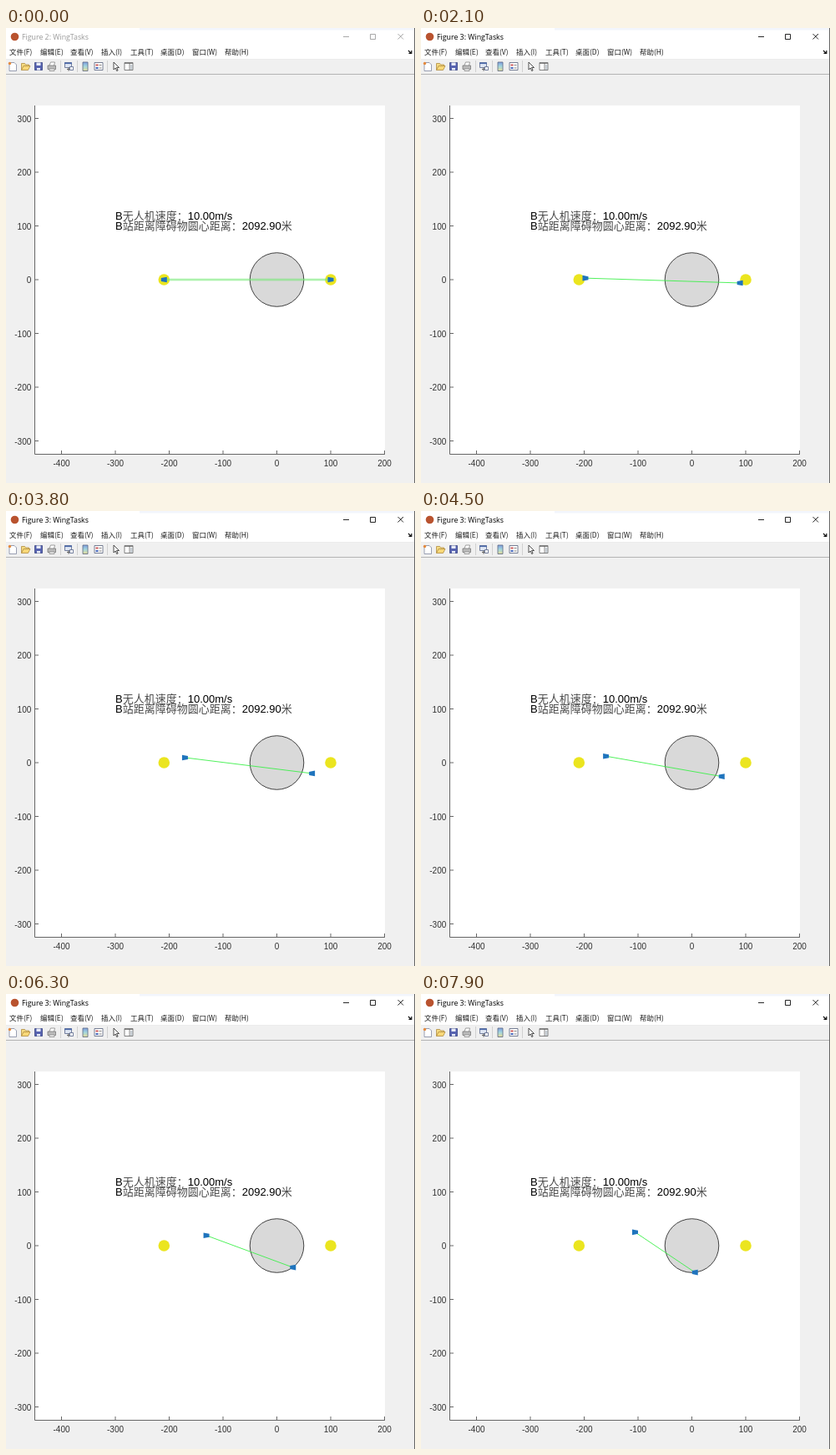
An HTML page that plays this animation: 490 px wide and 546 px high, repeating every 8000 ms.

```html
<!DOCTYPE html>
<html lang="zh">
<head>
<meta charset="utf-8">
<style>
  html, body { margin: 0; height: 100%; overflow: hidden; background: #fff; }
  svg { display: block; width: 490px; height: 546px; }
  .title { font: 8.8px "Open Sans", sans-serif; }
  .menu { font: 8.5px "Noto Sans CJK SC", "Noto Sans CJK", sans-serif; fill: #1c1c1c; }
  .tick { font: 10px "Liberation Sans", Arial, sans-serif; fill: #333; }
  .note { font: 300 13px "Liberation Sans", "Noto Sans CJK SC", "Noto Sans CJK", sans-serif; }
  .note tspan { fill: #4a4a4a; }
</style>
</head>
<body>
<svg viewBox="0 0 490 546">
  <rect width="490" height="546" fill="#fdfffe"/>
  <rect width="490" height="20" fill="#fff"/>
  <rect x="160" width="330" height="2.5" fill="#f2f5fc"/>
  <circle cx="10.5" cy="10.5" r="4.8" fill="#b9532f"/>
  <g id="bar">
    <text id="title" class="title" x="19" y="13.5"></text>
    <path d="M404 10.500h7M436.500 7.500h6v6h-6zM469.500 7l6.500 6.500M476 7l-6.500 6.500"
      fill="none" stroke="currentColor" stroke-width=".85"/>
  </g>

  <g id="figure">
    <path d="M0 20H490V38H0z" fill="#fff"/>
    <path d="M0 38H490V546H0z" fill="#f0f0f0"/>
    <path d="M0 37.500H490" stroke="#ececec"/>
    <path d="M0 55.500H490" stroke="#b4b4b4"/>
    <g id="menu" class="menu"></g>
    <path d="M482 27l3 3m.8-3v3.300h-3.300" fill="none" stroke="#111" stroke-width="1.200"/>

    <g fill="none" stroke-width=".8">
      <path d="M65.500 39v14M85.500 39v14M121.500 39v14" stroke="#c8c8c8"/>
      <path d="M4 41.500h6l2.500 2.500v7.500H4z" fill="#fff" stroke="#8088a0"/>
      <circle cx="4.500" cy="42.500" r="1.700" fill="#e58a3c"/>
      <path d="M18.500 50.500v-8h4l1 1.500h4v2" fill="#f5dc83" stroke="#b08c40"/>
      <path d="M18.500 50.500l2.500-5h8l-2.500 5z" fill="#f8d878" stroke="#b08c40"/>
      <path d="M34.500 41.500h9v9h-9z" fill="#5763b0" stroke="#3c4784"/>
      <path d="M36.500 41.500h5v3.500h-5zM37 48h4v2.500h-4z" fill="#e9edf8"/>
      <path d="M52 45l1.500-4h5l-1 4" fill="#fff" stroke="#888"/>
      <path d="M50 45h9.500v4.500H50z" fill="#bbb" stroke="#777"/>
      <path d="M52 49h6v2.500h-6z" fill="#eee" stroke="#888"/>
      <path d="M70.500 41.500h8v6h-8z" fill="#dfe6f3" stroke="#56648a"/>
      <path d="M70 42.300h9" stroke="#4b68a8" stroke-width="1.600"/>
      <path d="M73 49.500h4m-2-2v4" stroke="#666" stroke-width="1.200"/>
      <path d="M76.500 46.500h4v4h-4z" fill="#fff" stroke="#56648a"/>
      <path d="M92 41h6v10.500h-6z" fill="url(#spectrum)" stroke="#5a6680"/>
      <path d="M106 41.500h10v9h-10z" fill="#fff" stroke="#56607c"/>
      <path d="M107.500 44.500h3" stroke="#c55" stroke-width="2"/>
      <path d="M107.500 48h3" stroke="#46b" stroke-width="2"/>
      <path d="M111.500 44.500h3m-3 3.500h3" stroke="#666"/>
      <path d="M129 41v9l2.200-2 1.500 3.500 1.400-.6-1.500-3.400h2.900z" fill="#fff" stroke="#222"/>
      <path d="M142 41.500h10v9h-10z" fill="#fff" stroke="#666"/>
      <path d="M142 42.500h10M148 42v8.500" stroke="#666"/>
      <path d="M149 45h2.500m-2.500 2h2.500m-2.500 2h2.500" stroke="#789"/>
    </g>

    <path d="M35 93H454V511H35z" fill="#fff"/>
    <path d="M34.500 93V511.500H454" fill="none" stroke="#666"/>
    <g id="axes" class="tick" stroke-width=".9"></g>
    <g class="note">
      <text x="131" y="230.300">B<tspan>无人机速度：</tspan>10.00m/s</text>
      <text x="131" y="242.300">B<tspan>站距离障碍物圆心距离：</tspan>2092.90<tspan>米</tspan></text>
    </g>

    <circle cx="324.500" cy="302" r="32.300" fill="#d9d9d9" stroke="#222" stroke-width=".85"/>
    <g fill="#ebe51f">
      <circle cx="189.300" cy="302" r="6.800"/>
      <circle cx="389" cy="302" r="6.800"/>
    </g>
    <path id="halo" d="M190 302H388" stroke="#4e4" stroke-width="2.800" opacity=".28"/>
    <path id="link" fill="none" stroke-width=".9"/>
    <path id="left" d="M-3.500-3.300L3.500-2V2L-3.500 3.300z" fill="#1f74bd"/>
    <path id="right" d="M-3.500-3.300L3.500-2V2L-3.500 3.300z" fill="#1f74bd"/>
  </g>
  <path d="M489.500 0V546" stroke="#666"/>
  <defs>
    <linearGradient id="spectrum" x2="0" y2="1">
      <stop stop-color="#7f9fe0"/><stop offset=".5" stop-color="#a5d8dc"/><stop offset="1" stop-color="#e8dd98"/>
    </linearGradient>
  </defs>
</svg>
<script>
const LOOP = 8000, STEP = 100, OPENED = 1100, DRAWN = 1300, DEPART = 1350;
const SPEED = 10.55;               // pixels per second
const CENTER = { x: 324.5, y: 302 }, RADIUS = 32.3;
const LEFT = 189.3, RIGHT = 389;
const $ = id => document.getElementById(id);

const text = (x, y, label, anchor = 'start') =>
  `<text x="${x}" y="${y}" text-anchor="${anchor}">${label}</text>`;
const mark = d => `<path d="${d}" stroke="#555"/>`;

const menus = { 4: '文件(F)', 41: '编辑(E)', 77: '查看(V)', 114: '插入(I)',
  149: '工具(T)', 185: '桌面(D)', 223: '窗口(W)', 262: '帮助(H)' };
$('menu').innerHTML = Object.entries(menus).map(([x, label]) => text(x, 32, label)).join('');

let axes = '';
for (let v = -400; v <= 300; v += 100) {
  const x = CENTER.x + v * .645, y = CENTER.y - v * .645;
  if (v <= 200) axes += text(x, 525.6, v, 'middle') + mark(`M${x} 511v-4`);
  if (v >= -300) axes += text(30.3, y + 4, v, 'end') + mark(`M35 ${y}h4`);
}
$('axes').innerHTML = axes;

// Straight along the tangent, then around the obstacle.
function detour(dist) {
  const tangent = RADIUS * Math.sqrt(3);
  if (dist < tangent) return { x: RIGHT - dist * Math.cos(Math.PI / 6), y: CENTER.y + dist / 2 };
  const a = Math.PI / 3 + (dist - tangent) / RADIUS;
  return { x: CENTER.x + RADIUS * Math.cos(a), y: CENTER.y + RADIUS * Math.sin(a) };
}

function place(id, p, facing) {
  $(id).setAttribute('transform', `translate(${p.x} ${p.y}) scale(${facing} 1)`);
}

function render(t) {
  const opened = t >= OPENED;
  const dist = opened ? Math.max(0, t - DEPART) / 1000 * SPEED : 0;
  const a = { x: LEFT + dist * .9725, y: CENTER.y - dist * .234 };
  const b = detour(dist);
  const color = opened ? '#000' : '#999';

  $('title').textContent = `Figure ${opened ? 3 : 2}: WingTasks`;
  $('bar').setAttribute('fill', color);
  $('bar').setAttribute('color', color);
  $('figure').style.display = opened && t < DRAWN ? 'none' : '';
  $('halo').style.display = opened ? 'none' : '';
  $('link').setAttribute('d', `M${a.x} ${a.y}L${b.x} ${b.y}`);
  $('link').setAttribute('stroke', opened ? '#3df04a' : '#8be68b');
  place('left', a, opened ? 1 : -1);
  place('right', b, opened ? -1 : 1);
}

function tick() {
  const t = performance.now() % LOOP;
  render(Math.floor(t / STEP) * STEP);
  requestAnimationFrame(tick);
}
tick();
</script>
</body>
</html>
```
